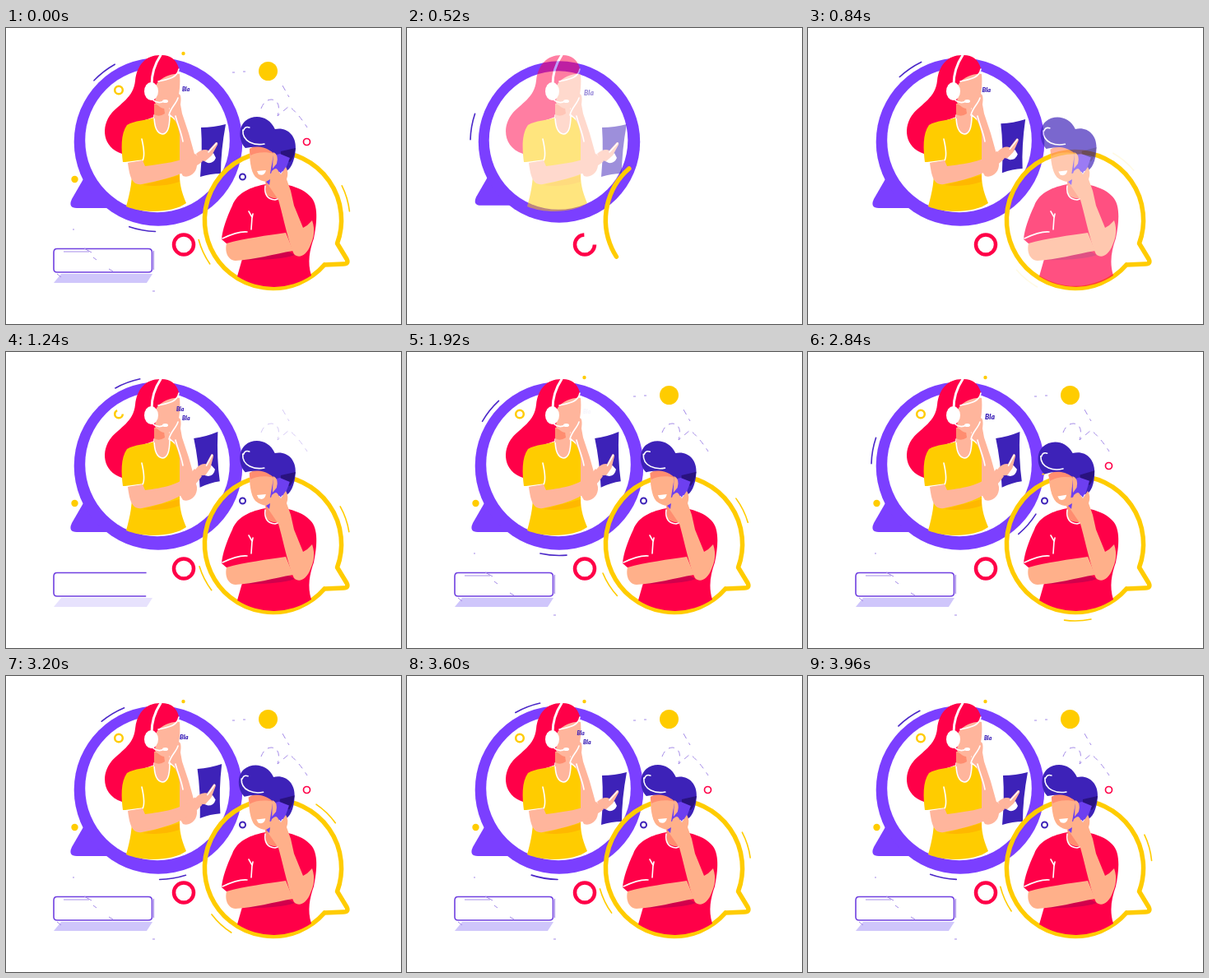
Recreate the animation shown at these times as an HTML page. Size 480x360 px, loop 4 s.

```html
<!DOCTYPE html>
<html lang="en">
<head>
<meta charset="utf-8">
<title>Support call</title>
<style>
html, body { margin: 0; width: 100%; height: 100%; overflow: hidden; background: #fff; }
svg { display: block; width: 100%; height: 100%; }
path, circle { fill: none; }
.skin { fill: #ffb08a; } .shade { fill: #ff8d70; }
#woman .skin { fill: #ffb59c; }
.red { fill: #ff0048; } .darkRed { fill: #d1004c; }
.yellow { fill: #fc0; } .amber { fill: #ffb800; }
.purple { fill: #7b3fff; } .phone { fill: #6d3ff0; }
.indigo { fill: #3d22b8; } .navy { fill: #29127f; }
.lavender { fill: #cfc6fb; } .white { fill: #fff; }
.line { stroke: #fff; stroke-width: 1.6; stroke-linecap: round; stroke-linejoin: round; }
.band { stroke-width: 3; }
.faint { stroke: #a48ae8; }
.orbit { stroke-width: 1.6; stroke-linecap: round; }
text { font: italic 900 7px Lato, sans-serif; fill: #3d22b8; }
</style>
</head>
<body>
<svg viewBox="0 0 480 360">
  <g id="ring">
    <path class="purple" d="M95 182L80 208Q75 219 86 219H124L140 190Z"/>
    <circle class="purple" cx="185" cy="138.500" r="102.300"/>
    <circle class="white" cx="184" cy="136.500" r="87.800"/>
  </g>
  <path id="purpleA" class="orbit" stroke="#4b28c8"/>
  <path id="purpleB" class="orbit" stroke="#4b28c8"/>

  <g id="woman">
    <path class="red" d="M187 33C170 33 159 45 157 64C155 85 138 92 128 104C115 120 117 145 141 153L144 130C151 115 166 114 180 108L182 95L186 65C199 63 210 61 210 49C207 37 198 32 187 33Z"/>
    <path class="skin" d="M197 103C199 93 206 92 209 80C213 80 213 86 212 93L214 104L222 128L232 164C233 175 224 183 215 180L208 168L205 110Z"/>
    <path class="yellow" d="M147 118C157 112 169 113 180 109L200 108C206 111 209 118 211 130L211 178C211 193 215 203 219 213C203 225 167 226 146 217C151 200 154 184 153 164L142 163C140 148 139 129 147 118Z"/>
    <path class="skin line" d="M180 106C180 120 183 128 190 129C197 129 199 120 199 106"/>
    <path class="skin" d="M180 92H198V110H180Z"/>
    <path class="shade" d="M180 92L192 97L193 104Q186 109 180 105Z"/>
    <path class="skin" d="M183 68C190 59 202 55 211 56C212 67 211 80 208 88C205 97 195 101 187 96L181 91Z"/>
    <path class="line" stroke-width="1" d="M198 106C200 97 207 92 209 85M165 135C168 148 169 156 166 161L143 164M206 107C208 116 213 126 215 138"/>
    <path class="amber" d="M166 191L211 179V187Q190 194 166 191Z"/>
    <path id="tablet" class="indigo" d="M-13 -28Q2 -28 17 -32Q11 0 11 28Q-1 28 -14 32Q-11 0 -13 -28Z"/>
    <path id="forearm" class="skin"/>
    <g id="hand">
      <path class="white" d="M3 6L14 -4L17 2Q14 9 7 8Z"/>
      <path class="skin" d="M-7 -3Q1 -10 8 -7L17 -17Q20 -17 19 -14L12 -1L4 6L-3 5Z"/>
      <path class="line" d="M18 -16L8 -5"/>
    </g>
    <path class="line" d="M185 65C197 62 208 61 210 50"/>
    <path class="line band" d="M177 69C177 53 182 42 188 33"/>
    <ellipse class="white" cx="176.500" cy="77" rx="8.500" ry="11"/>
    <path class="line" d="M178 87Q185 93 192 89"/>
    <ellipse class="white" cx="193.500" cy="89" rx="3.500" ry="2"/>
    <text id="wordA">Bla</text>
    <text id="wordB">Bla</text>
  </g>

  <path id="bubble" pathLength="100" stroke="#fc0" stroke-width="5.500" stroke-linecap="round" stroke-linejoin="round" d="M387 288A83 83 0 1 1 324.500 150.500A83 83 0 0 1 402.500 262L414 281Q417 287 410 287L387 288"/>
  <path id="yellowA" class="orbit" stroke="#fc0"/>
  <path id="yellowB" class="orbit" stroke="#fc0"/>

  <g id="man">
    <path class="red" d="M316 190C298 193 281 200 275 216C268 231 263 245 262 257L269 263L287 281L281 302A82 82 0 0 0 371 301C366 285 369 270 374 256C378 237 380 215 370 205C362 196 350 193 340 190Z"/>
    <path class="darkRed" d="M286 282L340 270L351 276Q331 283 286 282Z"/>
    <g id="head">
      <path class="shade" d="M315 180L337 180L340 202Q330 212 316 203Z"/>
      <path class="skin" d="M296 147C307 140 324 144 328 158L329 180C325 189 312 189 303 181C297 174 296 159 296 147Z"/>
      <path class="shade" d="M296 147C306 140 324 144 327 153C315 150 304 151 297 155Z"/>
      <path class="indigo" d="M291 146C284 139 281 122 291 113C302 104 320 107 327 123C341 120 353 130 352 147C351 163 345 173 340 174L326 169L325 152C313 142 302 144 291 146Z"/>
      <path class="navy" d="M334 150L352 146Q350 158 345 163L334 159Z"/>
      <path class="line" d="M288 124C287 139 303 143 314 141M289 124Q291 119 296 121"/>
      <path class="white" d="M305 174L316 173Q314 181 307 178Z"/>
      <path class="phone" d="M325 155L333 153L345 158L339 174L321 177Z"/>
      <path class="skin" d="M325 151Q332 154 329 165L324 171Z"/>
    </g>
    <path class="skin" d="M268 262C289 256 319 252 340 249L349 271C325 275 301 282 279 283C268 282 266 270 268 262Z"/>
    <path class="skin" d="M318 190L323 174Q329 168 331 174L334 178L340 169Q344 175 341 184L346 198L350 216L361 243L366 240L372 234C376 246 374 255 370 264C365 277 356 281 350 275C343 260 337 230 331 209Z"/>
    <path class="phone" d="M316 187L321 184L320 191Z M329 171L337 170L334 177Z"/>
    <path class="line" d="M315 192Q313 208 327 209L330 208M263 256Q282 247 293 248M295 223L299 230L298 245M300 226L299 231"/>
  </g>

  <path id="shadow" class="lavender" d="M67 299H178L171 310H58Z"/>
  <path id="frame" pathLength="100" stroke="#7040e0" stroke-width="1.600" d="M177.500 283V293Q177.500 297 173 297H62Q58 297 58 293V273Q58 268.500 62 268.500H173Q177.500 268.500 177.500 273V283"/>
  <path id="details" class="faint" d="M70 272H101M95 268L104 273M106 279L110 282M125 293L130 296M179.500 271V294M62 299L67 303M82 244V246M178 320H181M275 54H278M288 53H291"/>
  <path id="trail" class="faint" stroke-dasharray="7 6" d="M310 98Q314 87 323 87Q335 89 330 107L344 95Q356 105 366 121M336 70L344 84"/>

  <circle id="redRing" cx="216" cy="263.500" r="12" pathLength="100" stroke="#ff0048" stroke-width="4.500"/>
  <circle id="smallYellow" cx="137" cy="75.500" r="4.800" pathLength="100" stroke="#fc0" stroke-width="2.500"/>
  <circle id="smallRed" cx="365.500" cy="138.500" r="4" stroke="#ff0048" stroke-width="1.700"/>
  <circle id="smallIndigo" cx="287.500" cy="181" r="3.500" stroke="#3d22b8" stroke-width="2"/>
  <circle id="bigDot" class="yellow" cx="318.500" cy="52.500" r="11.500"/>
  <circle id="leftDot" class="yellow" cx="83.500" cy="184" r="4.200"/>
  <circle id="topDot" class="yellow" cx="215.500" cy="31" r="2.200"/>
</svg>
<script>
const LOOP = 4000, STEP = 40, SWING = 2320, SWING_START = 520;

const set = (id, attrs) => {
  const node = document.getElementById(id);
  for (const name in attrs) node.setAttribute(name, attrs[name]);
};
const clamp = x => Math.min(1, Math.max(0, x));
const mix = (a, b, k) => a + (b - a) * k;
const ramp = (t, from, to) => { const x = clamp((t - from) / (to - from)); return x * x * (3 - 2 * x); };
const fade = (id, t, from, to) => set(id, { opacity: ramp(t, from, to) });
const scaleAbout = (x, y, k) => `translate(${x} ${y}) scale(${k}) translate(${-x} ${-y})`;

// Swings 0 -> 1 -> 0; a bend below 1 makes the way out faster than the way back.
function swing(t, bend) {
  const phase = ((t - SWING_START + SWING) % SWING) / SWING;
  return Math.sin(Math.PI * phase ** bend);
}

// Shows a part of a path that grows in both directions from mid.
function trim(id, mid, k) {
  const from = mid * (1 - k), to = mix(mid, 100, k);
  set(id, { visibility: k > 0 ? 'visible' : 'hidden',
    'stroke-dasharray': k < 1 ? `${to - from} 200` : 'none', 'stroke-dashoffset': -from });
}

function orbit(id, cx, cy, r, angle, span) {
  const point = a => [cx + r * Math.cos(a * Math.PI / 180), cy + r * Math.sin(a * Math.PI / 180)].join(' ');
  set(id, { d: `M${point(angle - span / 2)}A${r} ${r} 0 0 1 ${point(angle + span / 2)}` });
}

function pop(id, t, from, to) {
  const { cx, cy } = document.getElementById(id);
  set(id, { transform: scaleAbout(cx.baseVal.value, cy.baseVal.value, ramp(t, from, to)) });
}

// A word grows in, drifts up to the left, shrinks a little and fades.
function word(id, age, x, y, drift, size) {
  const k = clamp(age / 800);
  set(id, { x: x - drift * k, y: y - 11 * k, opacity: 1 - ramp(age, 740, 900),
    style: `font-size:${mix(size, 6.5, k) * ramp(age, -120, 0)}px` });
}

function drawWoman(t) {
  const raised = ramp(t, 680, 1120) * (1 - ramp(t, 2960, 3440));
  const x = mix(238, 237, raised), y = mix(156, 145, raised);
  set('tablet', { transform: `translate(${mix(250, 245, raised)} ${mix(149, 131, raised)}) rotate(${-8 * raised})` });
  set('forearm', { d: `M148 164L166 161L169 168C190 165 213 163 ${x - 8} ${y - 3}L${x + 1} ${y + 6}C220 178 190 185 165 190C152 192 150 178 148 164Z` });
  set('hand', { transform: `translate(${x} ${y}) rotate(${-14 * raised})` });

  const age = (t - SWING_START + SWING) % SWING;
  word('wordA', age, 215, 82, 9, 8.5);
  word('wordB', age - 520, 214, 86, 0, 7);
  fade('woman', t, 340, 700);
}

function drawOrbits(t) {
  const quick = swing(t, 0.55) ** 2, slow = swing(t, 0.8);
  orbit('purpleA', 185, 138.5, 108, 190 + 60 * quick, 17);
  orbit('purpleB', 185, 138.5, 109, 41 + 61 * slow, 17);
  orbit('yellowA', 324.5, 233.5, 93.5, -105 + 91 * slow, 20);
  orbit('yellowB', 324.5, 233.5, 93.5, 88 + 69 * slow, 20);
  fade('purpleA', t, 360, 500);
  fade('purpleB', t, 1400, 1700);
  fade('yellowA', t, 800, 1000);
  fade('yellowB', t, 800, 1000);
  set('head', { transform: `rotate(${-4 * (1 - slow)} 325 200)` });
}

function draw(t) {
  const grown = 1 - (1 - clamp((t - 40) / 600)) ** 2;
  set('ring', { transform: scaleAbout(185, 138, grown) });
  fade('ring', t, 40, 520);
  drawWoman(t);
  drawOrbits(t);

  trim('bubble', 36, ramp(t, 400, 800));
  fade('man', t, 640, 960);

  trim('frame', 50, ramp(t, 840, 1360));
  fade('shadow', t, 1000, 1480);
  fade('details', t, 1300, 1600);
  fade('trail', t, 1100, 1400);

  trim('redRing', 0, ramp(t, 280, 640));
  trim('smallYellow', 0, ramp(t, 1040, 1360));
  pop('smallIndigo', t, 880, 1160);
  pop('leftDot', t, 960, 1240);
  pop('bigDot', t, 1280, 1640);
  pop('topDot', t, 1320, 1600);
  pop('smallRed', t, 1960, 2320);
}

const start = performance.now();
function tick() {
  const t = Math.floor(((performance.now() - start) % LOOP) / STEP) * STEP;
  // The loop opens on its finished pose for one step, then clears.
  draw(t || LOOP);
  requestAnimationFrame(tick);
}
tick();
</script>
</body>
</html>
```
